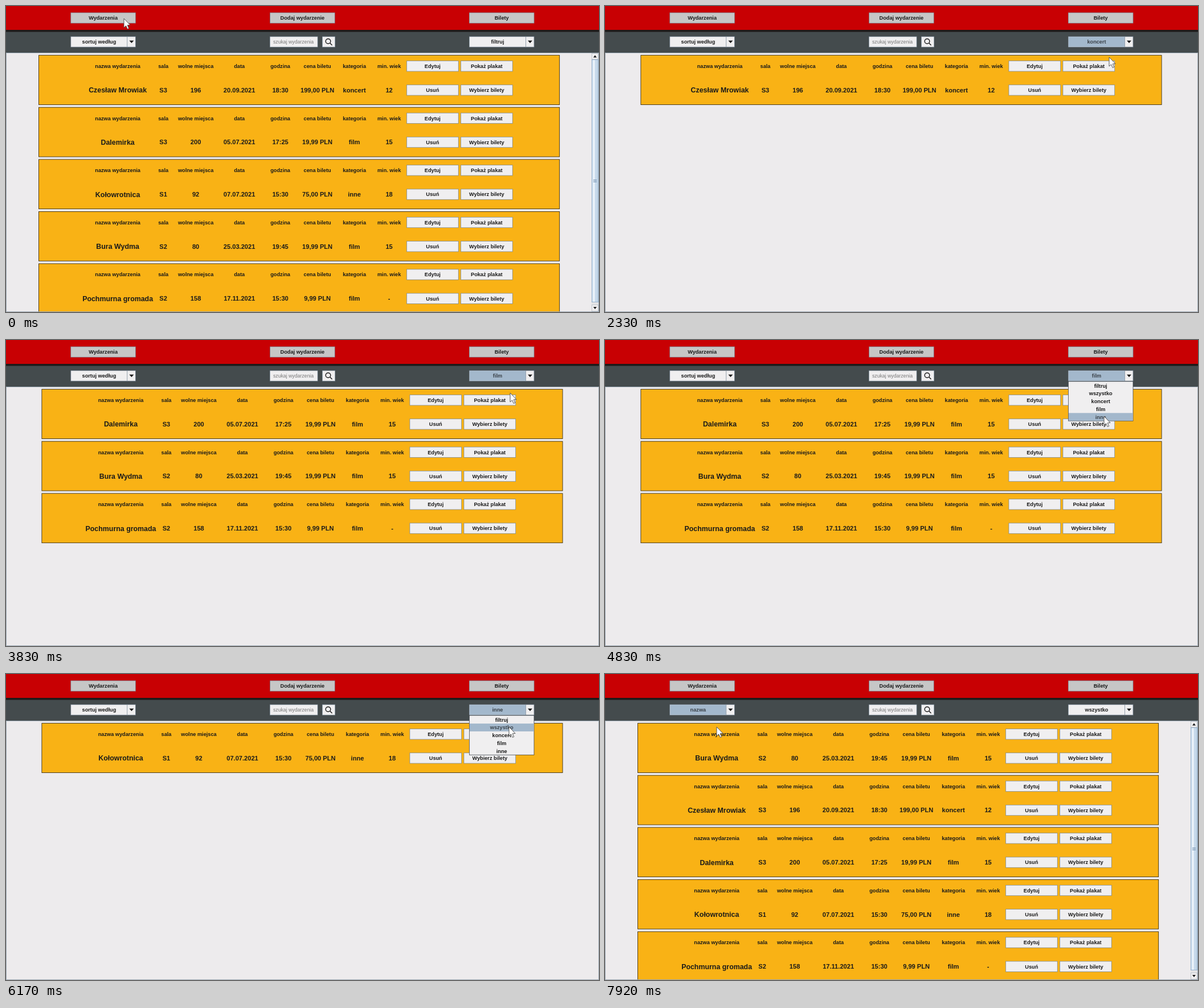
Animation of 1041 by 538 pixels, one loop 8000 ms. Source, as an HTML page with a canvas:

```html
<!DOCTYPE html>
<html lang="pl">
<head>
<meta charset="utf-8">
<style>
  html, body { margin: 0; width: 100%; height: 100%; overflow: hidden; background: #edebed; }
  canvas { display: block; }
</style>
</head>
<body>
<canvas id="stage" width="1041" height="538"></canvas>
<script>
const ctx = document.getElementById('stage').getContext('2d');
const LOOP = 8000, RATE = 12;
const UNIT = 0.7625;  // one logical pixel of the scaled-down window
const BUTTON_H = 25 * UNIT, BUTTON_W = 120 * UNIT, WIDE = 150 * UNIT, ROW = 18 * UNIT, PITCH = 91.6;
const BLUE = '#a3b8cc', EDGE = '#7a8a99', LIGHT = '#f0eff0', INK = '#1a1a1a';

const COLUMNS = [
  ['nazwa wydarzenia', 139], ['sala', 219], ['wolne miejsca', 276], ['data', 352.5],
  ['godzina', 424.5], ['cena biletu', 489.5], ['kategoria', 554.5], ['min. wiek', 615.5]
];
const EVENTS = [
  'Czesław Mrowiak|S3|196|20.09.2021|18:30|199,00 PLN|koncert|12',
  'Dalemirka|S3|200|05.07.2021|17:25|19,99 PLN|film|15',
  'Kołowrotnica|S1|92|07.07.2021|15:30|75,00 PLN|inne|18',
  'Bura Wydma|S2|80|25.03.2021|19:45|19,99 PLN|film|15',
  'Pochmurna gromada|S2|158|17.11.2021|15:30|9,99 PLN|film|-'
].map(line => line.split('|'));

const FILTER = { x: 813, items: ['filtruj', 'wszystko', 'koncert', 'film', 'inne'] };
const SORT = { x: 113.4, items: ['sortuj według', 'nazwa'] };

// Each visit opens a menu and picks an item; times in ticks of 1/12 s
const VISITS = [
  { menu: FILTER, item: 2, open: 18, pick: 25, pressX: 866, itemX: 884 },
  { menu: FILTER, item: 3, open: 33, pick: 42, pressX: 886, itemX: 886 },
  { menu: FILTER, item: 4, open: 51, pick: 60, pressX: 884, itemX: 876 },
  { menu: FILTER, item: 1, open: 67, pick: 75, pressX: 880, itemX: 883 },
  { menu: SORT, item: 1, open: 86, pick: 92, pressX: 190, itemX: 196 }
];

// The pointer reaches the box just before it opens and the item just before the pick
const STOPS = [{ from: 0, to: 0, x: 207, y: 22 }];
VISITS.forEach((v, i) => STOPS.push(
  { from: i ? VISITS[i - 1].pick : 0, to: v.open - (i ? 1 : 3), x: v.pressX, y: 65 },
  { from: v.open, to: v.pick - 2, x: v.itemX, y: 79 + v.item * ROW }
));

function pointerAt(tick) {
  let { x, y } = STOPS[0];
  for (const stop of STOPS.slice(1)) {
    const u = Math.min(1, Math.max(0, (tick - stop.from) / (stop.to - stop.from)));
    const ease = u * u * (3 - 2 * u);
    x += (stop.x - x) * ease;
    y += (stop.y - y) * ease;
  }
  return [Math.round(x), Math.round(y)];
}

function chosen(menu, tick) {
  const done = VISITS.filter(v => v.menu === menu && v.pick <= tick).pop();
  return done ? done.item : 0;
}

function rect(x, y, w, h, fill) {
  ctx.fillStyle = fill;
  ctx.fillRect(x, y, w, h);
}

function box(x, y, w, h, fill, edge = EDGE) {
  rect(x, y, w, h, edge);
  rect(x + UNIT, y + UNIT, w - 2 * UNIT, h - 2 * UNIT, fill);
}

function text(str, x, y, size = 9.2, color = INK, weight = 'bold') {
  ctx.font = `${weight} ${size}px "Liberation Sans", Arial, sans-serif`;
  ctx.textAlign = 'center';
  ctx.fillStyle = color;
  ctx.fillText(str, x, y + size * 0.36);
}

function shape(points, fill) {
  ctx.beginPath();
  points.forEach(([x, y]) => ctx.lineTo(x, y));
  ctx.closePath();
  ctx.fillStyle = fill;
  ctx.fill();
}

function arrow(x, y, half, depth) {
  shape([[x - half, y - depth / 2], [x + half, y - depth / 2], [x, y + depth / 2]], INK);
}

// Placed by its vertical centre
function button(label, x, y, w = BUTTON_W, fill = LIGHT) {
  box(x, y - BUTTON_H / 2, w, BUTTON_H, fill);
  text(label, x + w / 2, y);
}

function card(event, x, y) {
  const head = y + 19.5, body = y + 61.7;
  box(x, y, 1200 * UNIT, 115 * UNIT, '#f9b215', '#1d1607');
  COLUMNS.forEach(([label, dx], i) => {
    text(label, x + dx, head);
    text(event[i], x + dx, body, i ? 11.1 : 12.4);
  });
  button('Edytuj', x + 646, head);
  button('Pokaż plakat', x + 741, head);
  button('Usuń', x + 646, body);
  button('Wybierz bilety', x + 741, body);
}

function scrollbar() {
  rect(1028, 83, 12, 454, '#e4e4e6');
  box(1028, 83, 12, 11, LIGHT, '#b5bcc3');
  arrow(1034, 88.5, 3, -4);
  box(1028, 94, 12, 427, '#c5d8ea', '#8fabc7');
  rect(1030, 95, 4, 425, '#e6f0f8');
  for (let y = 305; y < 311; y += 2) rect(1031, y, 6, 1, '#7f9bb8');
  box(1028, 525, 12, 12, LIGHT, '#b5bcc3');
  arrow(1034, 531, 3, 4);
}

function combo(menu, index, focused) {
  const { x, items } = menu;
  box(x, 63 - BUTTON_H / 2, WIDE, BUTTON_H, LIGHT);
  if (focused) rect(x + 1, 54.2, 98, 17.5, BLUE);
  rect(x + 99, 53.5, UNIT, BUTTON_H, EDGE);
  arrow(x + 107, 63, 4, 4.5);
  text(items[index], x + 50, 63, 9.2, focused ? '#3a4148' : INK);
}

function popup(menu, index, pointerY) {
  const { x, items } = menu;
  const hover = pointerY < 74 ? index : Math.floor((pointerY - 73.5) / ROW);
  box(x, 72.5, WIDE, items.length * ROW + 1.5, LIGHT, '#3a4148');
  items.forEach((item, i) => {
    const y = 80.3 + i * ROW;
    if (i === hover) rect(x + 1, y - ROW / 2, WIDE - 2, ROW, BLUE);
    text(item, x + WIDE / 2, y, 9.2, i === hover ? '#3a4148' : INK);
  });
}

function toolbar() {
  rect(0, 0, 1041, 42, '#c80003');
  rect(0, 42, 1041, 4, '#1d1a1a');
  rect(0, 45.5, 1041, 36.5, '#444b4d');
  ['Wydarzenia', 'Dodaj wydarzenie', 'Bilety'].forEach((label, i) =>
    button(label, 113.4 + i * 349.8, 21, WIDE, '#c6c6c6'));
  box(463, 53.5, 84.5, BUTTON_H, LIGHT);
  text('szukaj wydarzenia', 504.5, 62.5, 8.7, '#777', 'normal');
  box(555, 53.5, 23, BUTTON_H, LIGHT);
  ctx.strokeStyle = INK;
  ctx.lineWidth = 1.4;
  ctx.beginPath();
  ctx.arc(565.5, 62, 4.3, 0, 7);
  ctx.moveTo(568.8, 65.3);
  ctx.lineTo(572.5, 69);
  ctx.stroke();
}

function cursor(x, y) {
  const outline = [[0, 0], [0, 16], [3.6, 12.8], [6.2, 18.5], [8.7, 17.4], [6.2, 11.8], [11, 11.5]];
  shape(outline.map(([dx, dy]) => [x + dx, y + dy]), '#fff');
  ctx.strokeStyle = '#555';
  ctx.lineWidth = 1;
  ctx.stroke();
}

function draw(tick) {
  const filter = chosen(FILTER, tick), sort = chosen(SORT, tick);
  const opened = VISITS.filter(v => v.open <= tick).pop();
  const focus = opened && opened.menu;
  const [px, py] = pointerAt(tick);
  const list = EVENTS.filter(e => filter < 2 || e[6] === FILTER.items[filter]);
  if (sort) list.sort((a, b) => a[0] < b[0] ? -1 : 1);
  const long = list.length > 4;

  rect(0, 0, 1041, 538, '#edebed');
  list.forEach((event, i) => card(event, long ? 57.1 : 62.5, 86.2 + i * PITCH));
  if (long) scrollbar();
  ctx.strokeStyle = '#9aa6b1';
  ctx.lineWidth = 1;
  ctx.strokeRect(0.5, 82.5, 1040, 455);

  toolbar();
  [[SORT, sort], [FILTER, filter]].forEach(([menu, index]) => {
    combo(menu, index, focus === menu);
    if (focus === menu && tick < opened.pick) popup(menu, index, py);
  });
  cursor(px, py);
}

function play() {
  const t = performance.now() % LOOP;
  // Small lead absorbs the rounding of tick times
  draw(Math.floor((t + 4) * RATE / 1000) % 96);
  requestAnimationFrame(play);
}
play();
</script>
</body>
</html>
```
